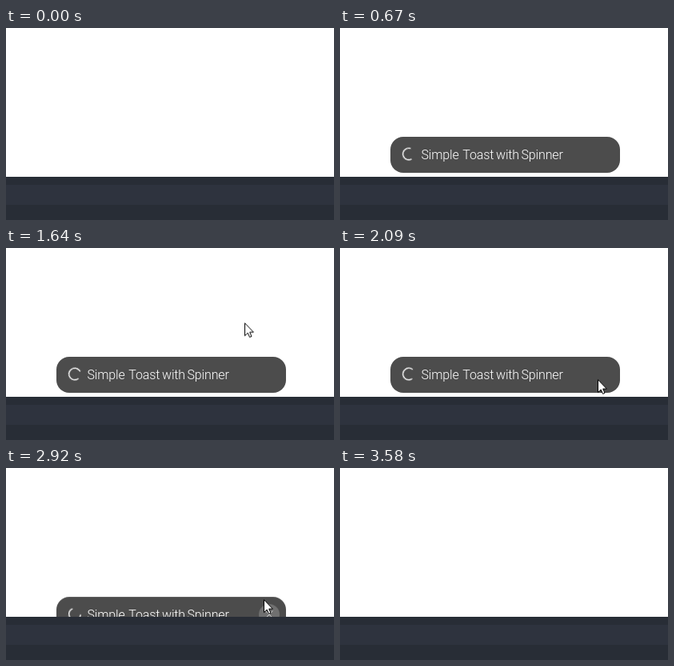
An HTML page that plays this animation: 410 by 240 pixels, repeating every 4.33 s.

```html
<!DOCTYPE html>
<html lang="en">
<head>
<meta charset="utf-8">
<title>Toast with spinner</title>
<style>
  html, body { margin: 0; width: 100%; height: 100%; overflow: hidden; background: #fff; }
  svg { display: block; width: 410px; height: 240px; }

  .toast, .ring, .close, .pointer, .arrow { animation: 4330ms linear infinite; }
  .toast { animation-name: slide; }
  .ring {
    animation-name: spin;
    transform-origin: 86px 157.5px;
    fill: none; stroke: #fff; stroke-width: 1.4;
  }
  .close { animation-name: hover; }
  .pointer { animation-name: travel; }
  .arrow { animation-name: present; animation-timing-function: step-end; }
  .label {
    font: 300 16px Roboto, "Liberation Sans", sans-serif;
    letter-spacing: -.15px;
    fill: #fff;
  }

  @keyframes slide {
    0% { transform: translateY(50px); }
    5.77% { transform: translateY(50px); animation-timing-function: ease; }
    14.55%, 62.12% { transform: none; }
    62.12% { animation-timing-function: ease; }
    72.75%, 100% { transform: translateY(50px); }
  }
  /* The arc turns while its length breathes. */
  @keyframes spin {
    0%, 5.77% { transform: rotate(-180deg); stroke-dasharray: 250 360; }
    9.47% { transform: rotate(50deg); stroke-dasharray: 270 360; }
    15.47% { transform: rotate(420deg); stroke-dasharray: 228 360; }
    37.88% { transform: rotate(1130deg); stroke-dasharray: 285 360; }
    61.43% { transform: rotate(1955deg); stroke-dasharray: 220 360; }
    72.75%, 100% { transform: rotate(2350deg); stroke-dasharray: 260 360; }
  }
  @keyframes hover {
    0%, 60.2% { opacity: 0; }
    61.2%, 73% { opacity: 1; }
    74%, 100% { opacity: 0; }
  }
  @keyframes travel {
    0%, 30.25% { transform: translate(279px, 11px); }
    31.87% { transform: translate(283px, 30px); }
    37.88% { transform: translate(298px, 93px); }
    45.03% { transform: translate(322px, 149px); animation-timing-function: ease-out; }
    48.5%, 72.98% { transform: translate(322px, 164px); }
    72.98% { animation-timing-function: ease-in-out; }
    81.3%, 100% { transform: translate(302px, 17px); }
  }
  @keyframes present {
    0% { visibility: hidden; }
    30.25% { visibility: visible; }
    82.68%, 100% { visibility: hidden; }
  }
</style>
</head>
<body>
<svg viewBox="0 0 410 240">
  <g class="toast">
    <rect x="63" y="136" width="287" height="45" rx="16" fill="#4c4c4c"/>
    <circle class="ring" cx="86" cy="157.5" r="7.3" pathLength="360"/>
    <text class="label" y="164"><tspan x="101.5">Simple </tspan><tspan x="153.3">Toast </tspan><tspan x="195">with </tspan><tspan x="226.5">Spinner</tspan></text>
    <g class="close">
      <circle cx="329" cy="158" r="13" fill="#707070"/>
      <path d="M324.5 153.5l9 9m0-9l-9 9" stroke="#e4e4e4" stroke-width=".9"/>
    </g>
  </g>

  <rect y="186" width="410" height="54" fill="#282d36"/>
  <rect y="196" width="410" height="25" fill="#2e333e"/>

  <g class="pointer">
    <path class="arrow" d="M.5 .7V16.6L4.2 13.1 6.6 18.4 9 17.3 6.7 12.1H11.4Z" fill="#fff" stroke="#000" stroke-width="1"/>
  </g>
</svg>
</body>
</html>
```
